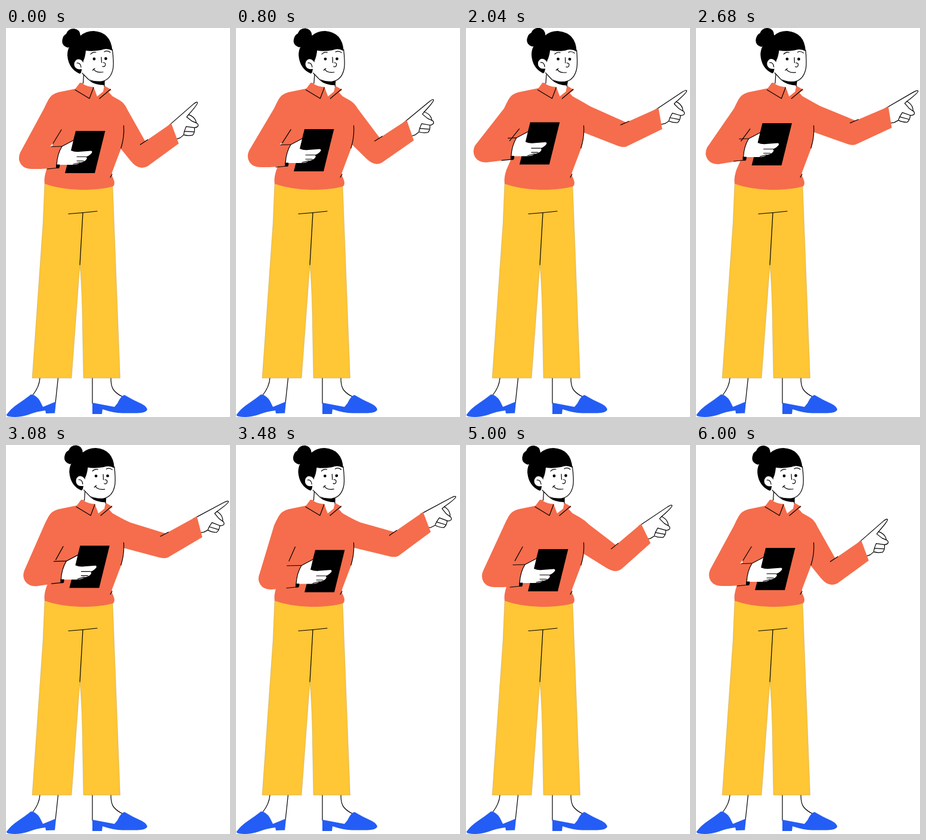
Recreate the animation shown at these times as an HTML page. Size 376x654 px, loop 6.04 s.

```html
<!DOCTYPE html>
<html lang="en">
<head>
<meta charset="utf-8">
<title>Pointing presenter</title>
<style>
html, body { margin: 0; width: 100%; height: 100%; overflow: hidden; background: #fff; }
svg { display: block; width: 100vw; height: 100vh; }
.line { fill: none; stroke: #000; stroke-width: 1.2; stroke-linecap: round; stroke-linejoin: round; }
.skin { fill: #fff; }
.top { fill: #f56d4c; }
.pants { fill: #ffc636; stroke: #a98f4a; stroke-width: .4; }
.shoe { fill: #245df5; }
</style>
</head>
<body>
<svg viewBox="0 0 376 654">
  <!-- legs -->
  <path class="line" d="M57 588Q56 603 45 617M87.500 588L83 630M145 588V631M176 588Q176 603 181 609Q187 616 196 620"/>
  <path class="shoe" d="M1 650Q8 640 20 632Q32 624 42 616Q51 617 57 627Q60 633 62 637L84 628L82 647.500L67 648L66 643Q50 645 38 650Q20 656 4 653Q0 652 1 650Z"/>
  <path class="shoe" d="M145 630L182 637L187 631Q193 618 199 617Q214 626 228 632Q237 637 237 642Q235 647 220 647.500H195Q180 647 162 641L161 649H145Z"/>
  <path class="pants" d="M65 260L62 330L44 588.500H110L124 398Q127 430 128 475L130 588.500H191.500L179 264Z"/>
  <path class="line" d="M105 312.500L129 310.500L153 308M129 310.500L124 398"/>

  <!-- pointing arm -->
  <g id="point">
    <path class="skin line" d="M270 167L314 128.500Q320 123.500 321 125.500Q322 128 306 146Q315 149 318 156L319 159.500Q323 162 322 165Q320 168 316 168Q317 176 313 180.500Q305 182 298 180L292 185L278 190Z"/>
    <path class="line" d="M306 146L303 150L312 157L319 160M316 168L302 166L299 174L315 175M299 174L298 179"/>
  </g>
  <path id="sleeve" class="top"/>

  <path class="top" d="M122 101L88 108Q76 111 71 121L84 190L75 222L68 238Q63 253 65 262Q90 271 125 272Q160 272 180 266Q184 262 180 253Q176 247 179 240L193 203Q198 185 198 165L196 126L179 115L168 103Z"/>
  <path class="line" d="M197.500 164Q199 183 193 202M178 246L175 251"/>
  <path id="fold" class="line"/>

  <!-- holding arm -->
  <path id="upper" class="top"/>
  <path id="seam" class="line"/>
  <path id="gap" class="skin"/>
  <g id="hold">
    <path class="line" d="M69 237L89 235"/>
    <path d="M117 173H166.500L149 244H99Z"/>
    <path class="skin" d="M94 199L113 189L109 206Q116 209 123 208L143 206.500Q147 208 141 213Q138 216 134 216.500Q138 219 133 223Q128 226 125 226Q120 230 110 230L85 230Q85 214 94 199Z"/>
    <path class="line" d="M113 189L94 199Q86 212 85 230M119 216.500L134 216.500M119 223.500L130 223.500M113 229L124 226"/>
    <path d="M84 229.500H90Q91 234 88 236H84Z"/>
  </g>

  <!-- collar and neck -->
  <g id="collar">
    <path class="top" d="M124 92L115 104L122 108L140 119H157L177 104L165 97Z"/>
    <path class="skin" d="M131 76L129 94Q137 99 147 99L153 115L163 107L165 97V84Z"/>
    <path class="line" d="M116 104L140 118.500L147 100M175.500 103L157 118.500M130.500 78L129.500 93M165 93V98"/>
  </g>

  <g id="head">
    <path class="skin" d="M124 40H179Q181 58 180 66Q178 86 160 90Q148 91 139 87L128 76Z"/>
    <path class="line" d="M178.500 36Q181 56 180 66Q177 87 160 90Q149 91 139 87L128 76"/>
    <path d="M139 88Q151 92 166 89L165 96Q149 96 139 88Z"/>
    <path d="M104 33Q93 30 94.500 20Q96 12 101 10Q104 1 114 1Q124 2 125 13Q134 5 147 5Q176 7 178.500 38Q169 33 160 37Q145 40 134 38Q133 49 130 55L126 75L124 77Q105 69 103 46Q103 38 106 32Z"/>
    <path class="skin" d="M130 59Q126 51 119 53Q113 57 115 64Q118 71 127 69L130 77L135 70V55Z"/>
    <path class="line" d="M119 59Q125 58 126 66M142 44Q145 40 151 41M165 40Q170 37 175 41M160 49L160.500 58M163 58Q168 58 166.500 63Q165 66 162 64.500M147 69Q151 76 163 74M145.500 71L149 68"/>
    <circle cx="148" cy="52" r="2.400"/>
    <circle cx="167.500" cy="51.500" r="2.400"/>
  </g>
</svg>
<script>
const LOOP = 6040, RAD = Math.PI / 180;
const el = id => document.getElementById(id);

// Each row: time, then the values held at that time
const HEAD = [[0, 0], [250, 0], [800, .3], [1400, 1], [1700, 1.04], [2680, .75], [3480, .2], [4400, 0], [LOOP, 0]];
// board shift x, y and extra elbow drop
const HOLD = [
  [0, 0, 0, 0], [250, 0, 0, 0], [800, -2, -3, 0], [1400, -9, -13, 2], [1700, -10, -14.5, 2],
  [1940, -9.5, -14.5, 3], [2680, -5.5, -13, 5], [3200, 11, -1, 4], [3480, 16, 3.5, 2.5],
  [4000, 18, 5, 1.5], [4480, 16, 5, 1], [5000, 5, 2, 0], [5760, 0, 0, 0], [LOOP, 0, 0, 0]
];
// elbow x, y, forearm angle, hand turn
const POINT = [
  [0, 230, 213.5, -34, 0], [250, 230, 213.5, -34, 0], [800, 238, 207, -32.7, 1.5],
  [1400, 263, 185, -27, 4.5], [1920, 267, 179, -24, 7], [2680, 266, 175, -22.7, 11],
  [3000, 268, 169, -27, 13], [3480, 267, 166, -34.3, 13], [4440, 264, 170.5, -36, 11],
  [5000, 252, 190, -39.6, 7.3], [5140, 245.5, 196.5, -39, 5.5], [5760, 231, 213, -34.5, .3],
  [LOOP, 230, 213.5, -34, 0]
];

// Monotone cubic through the keys
function sample(keys, t) {
  const i = Math.max(0, keys.findIndex((k, n) => n + 1 < keys.length && t < keys[n + 1][0]));
  const span = keys[i + 1][0] - keys[i][0], u = (t - keys[i][0]) / span;
  const rise = (n, c) => n < 0 || n + 1 >= keys.length ? 0 : (keys[n + 1][c] - keys[n][c]) / (keys[n + 1][0] - keys[n][0]);
  const slope = (n, c) => {
    const a = rise(n - 1, c), b = rise(n, c);
    return a * b > 0 ? 2 * a * b / (a + b) : 0;
  };
  return keys[i].slice(1).map((v, n) => {
    const c = n + 1, d = keys[i + 1][c] - v;
    const m0 = slope(i, c) * span, m1 = slope(i + 1, c) * span;
    return v + u * (m0 + u * (3 * d - 2 * m0 - m1 + u * (m0 + m1 - 2 * d)));
  });
}

const turn = (ox, oy, deg) => (x, y) => {
  const c = Math.cos(deg * RAD), s = Math.sin(deg * RAD);
  return [ox + x * c - y * s, oy + x * s + y * c];
};
const path = (id, d) => el(id).setAttribute('d', d);
const move = (id, v) => el(id).setAttribute('transform', v);

function drawPoint(t) {
  const [ex, ey, fore, hand] = sample(POINT, t);
  const up = Math.atan2(ey - 140, ex - 190) / RAD;
  const bend = up - fore - 55;
  const f = turn(ex, ey, fore), u = turn(ex, ey, up), mid = turn(ex, ey, (up + fore) / 2);
  const ix = 10.3 + bend * .14, inner = f(ix, -17);
  const pitY = 170 + .0088 * up * up, pitX = 199 - Math.max(0, pitY - 180) * .26;
  const round = [198 + (inner[0] - 198) * .15, 127 + (inner[1] - 127) * .15];
  path('sleeve', `M179 115L190 121Q199 126 ${round}L${inner}L${f(69, -17.5)}L${f(60.5, 17.5)}` +
    `L${f(-4, 20)}Q${mid(0, 24 + bend * .1)} ${u(-1, 23)}L${pitX} ${pitY}L185 170Z`);
  path('fold', `M${f(ix - 10, -17)}L${f(ix + 5, -17)}`);
  const [cx, cy] = f(65, 0);
  move('point', `translate(${cx} ${cy}) rotate(${hand}) translate(-283.5 -177.5)`);
}

function drawHold(t) {
  const [dx, dy, drop] = sample(HOLD, t);
  const x = 40 + dx, y = 220 + dy + drop;
  const creaseX = 79 + .62 * dx, creaseY = 194 + .3 * dy;
  path('upper', `M90 108Q76 111 71 121Q67 128 64 135L${x - 16} ${y - 11}Q${x - 21} ${y} ${x - 15} ${y + 9}` +
    `Q${x - 9} ${y + 17} ${x + 3} ${y + 17}L${x + 18} ${y + 17 - drop / 2}L${88 + dx} ${235 + dy}` +
    `L${95 + dx} ${199 + dy}L${creaseX + 8} ${creaseY - 14}Z`);
  path('seam', `M${93 + .4 * dx} ${171 + .1 * dy}L${creaseX} ${creaseY}` +
    `M${76 + .6 * dx} ${199.5 + dy}L${94 + dx} ${199 + dy}`);
  const s = Math.max(0, 1 - Math.abs(dx) / 6);
  path('gap', `M${78 + dx} ${199 + dy}v${-5 * s}l${-4 * s} ${5 * s}z`);
  move('hold', `translate(${dx} ${dy})`);
}

function frame(now) {
  const t = now % LOOP, [lean] = sample(HEAD, t);
  drawPoint(t);
  drawHold(t);
  move('collar', `translate(${4.5 * lean} 0)`);
  move('head', `translate(${5 * lean} 0) rotate(${2.4 * lean} 145 92)`);
  requestAnimationFrame(frame);
}
frame(0);
</script>
</body>
</html>
```
